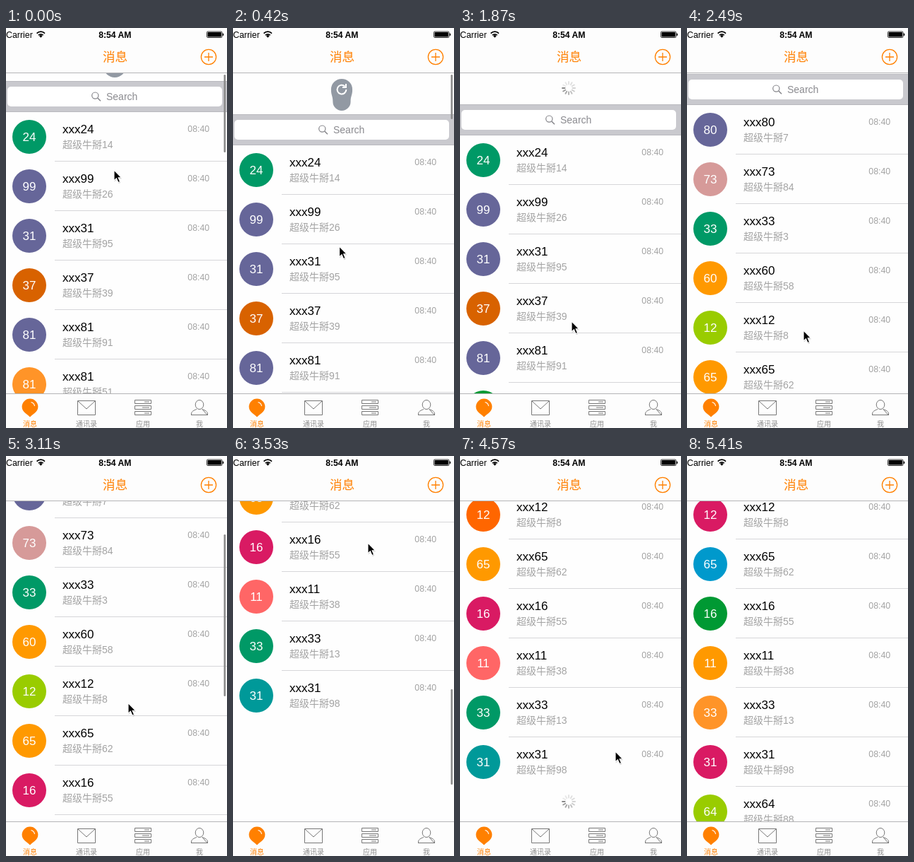
Animation of 313x566 px, one loop 5710 ms. Source, as an HTML page:

```html
<!DOCTYPE html>
<html lang="zh">
<head>
<meta charset="utf-8">
<title>消息</title>
<style>
  html, body { margin: 0; width: 100%; height: 100%; overflow: hidden; background: #fefefe; }
  svg { display: block; width: 100vw; height: 100vh; }
  text { font-family: "Liberation Sans", "Noto Sans CJK SC", "Noto Sans CJK", sans-serif; }
  .mid { text-anchor: middle; }
  .badge { font-size: 17px; fill: #fff; text-anchor: middle; }
  .name { font-size: 17px; fill: #000; }
  .note { font-size: 14px; font-weight: 300; fill: #a3a3a3; }
  .time { font-size: 12.3px; fill: #a3a3a3; }
  .rule { stroke: #d6d6d9; }
  .edge { stroke: #b4b4b6; }
  .line { fill: none; stroke: #777; }
  .tab { font-size: 10px; font-weight: 300; fill: #8c8c8c; text-anchor: middle; }
  .hot { fill: #ff8000; }
  .spin line { stroke: #777; stroke-width: 2; stroke-linecap: round; }
</style>
</head>
<body>
<svg viewBox="0 0 313 566">
  <rect width="313" height="566" fill="#fefefe"/>

  <path id="drop" fill="#9299a3"/>
  <path id="arrow" fill="none" stroke="#fff" stroke-width="2" d="M4.5-4.5A6.4 6.4 0 1 0 6.4 0M6-8V-3H1"/>
  <g id="topSpin" class="spin"></g>

  <g id="list">
    <g id="search">
      <rect width="313" height="44" fill="#c9c9ce"/>
      <path d="M0 .5H313M0 43.5H313" stroke="#b9b9be"/>
      <rect x="2" y="8" width="304" height="28" rx="5" fill="#fff"/>
      <g fill="none" stroke="#85858a" stroke-width="1.2">
        <circle cx="126.3" cy="20.6" r="4.6"/>
        <path d="M129.7 24L134 28.2" stroke-width="1.5"/>
      </g>
      <text x="142" y="27" font-size="14" fill="#8a8a8f">Search</text>
    </g>
    <g id="rows"></g>
    <g id="endSpin" class="spin"></g>
  </g>
  <rect id="bar" x="308.5" width="2.6" rx="1.3" fill="#8a8a8a"/>

  <!-- status and navigation -->
  <rect width="313" height="63" fill="#fdfdfd"/>
  <path class="edge" d="M0 63.5H313"/>
  <text x="0" y="13.5" font-size="12.4">Carrier</text>
  <g fill="none" stroke="#000" stroke-width="1.7">
    <path d="M43.6 7.6A8 8 0 0 1 55 7.6M45.9 10.2A4.8 4.8 0 0 1 52.7 10.2"/>
    <path d="M47 11.3A3.2 3.2 0 0 1 51.6 11.3L49.3 13.8Z" fill="#000" stroke="none"/>
  </g>
  <text class="mid" x="154.3" y="13.5" font-size="12.2" font-weight="bold">8:54 AM</text>
  <rect x="284.5" y="5" width="21.5" height="8.5" rx="1.3" fill="none" stroke="#000" stroke-width=".8"/>
  <rect x="285.6" y="6.1" width="19.3" height="6.3" rx=".5"/>
  <path d="M307 7.6A2 2 0 0 1 307 11Z" stroke="#000" stroke-width=".8"/>
  <text class="mid hot" x="154.5" y="47" font-size="17.6" font-weight="300">消息</text>
  <g fill="none" stroke="#ff8000" stroke-width="1.3">
    <circle cx="287" cy="41" r="10.6"/>
    <path d="M281 41H293M287 35V47"/>
  </g>

  <!-- tab bar -->
  <rect y="517" width="313" height="49" fill="#fdfdfd"/>
  <path class="edge" d="M0 517.5H313"/>
  <path class="hot" d="M34 550.5C31 547 22.6 543.500 22.6 536A11.400 11.400 0 0 1 45.400 536C45.400 543.500 37 547 34 550.5Z"/>
  <path d="M35.500 529.500A6.500 6.500 0 0 1 40.500 535" fill="none" stroke="#fff" stroke-width="1.1"/>
  <g class="line">
    <path d="M101.500 527.500H126.500V547.500H101.500ZM102 528L114 539L126 528"/>
    <path d="M182.500 526.500H205.500V531.500H182.500ZM182.500 534.500H205.500V539.500H182.500ZM182.500 542.500H205.500V547.500H182.500Z"/>
    <path d="M196 529H203M193 537H203M196 545H203"/>
    <ellipse cx="274" cy="533" rx="5.800" ry="6.500"/>
    <path d="M262.500 548V546C262.500 542.500 266 541 270 539.500M278 539.500C282 541 285.500 542.500 285.500 546V548Z"/>
    <path d="M262.500 547.500H285.500"/>
  </g>
  <text class="tab hot" x="34" y="563.5">消息</text>
  <text class="tab" x="114" y="563.5">通讯录</text>
  <text class="tab" x="194" y="563.5">应用</text>
  <text class="tab" x="274" y="563.5">我</text>

  <g id="cursor">
    <path d="M0 0V15L3.400 11.800L6 17.600L8.600 16.500L6.100 10.800H10.600Z" transform="translate(.6 1.4)" fill="#000" opacity=".2"/>
    <path d="M0 0V15L3.400 11.800L6 17.600L8.600 16.500L6.100 10.800H10.600Z" stroke="#fff" stroke-width="1.1"/>
  </g>
</svg>
<script>
const LOOP = 5710, STEP = 208, TOP = 64, SEARCH = 44, ROW = 70, MID = 154;
const REST = 340;            // scroll distance with the footer open
const RELOAD = 12, APPEND = 25;
const $ = id => document.getElementById(id);
const clamp = (v, lo, hi) => Math.min(hi, Math.max(lo, v));
const move = (el, x, y, turn = 0) =>
  el.setAttribute('transform', `translate(${x} ${y}) rotate(${turn})`);

const purple = '#666699', green = '#009966', leaf = '#009933', amber = '#ff9900',
  peach = '#ff9428', lime = '#99cc00', berry = '#d91a63';

// each row: number, note number, badge colour
const first = [[24, 14, green], [99, 26, purple], [31, 95, purple], [37, 39, '#d86200'],
  [81, 91, purple], [81, 51, peach], [45, 72, lime]];
const second = [[80, 7, purple], [73, 84, '#d69a99'], [33, 3, green], [60, 58, amber],
  [12, 8, lime], [65, 62, amber], [16, 55, berry], [11, 38, '#ff6666'],
  [33, 13, green], [31, 98, '#009999']];
const fresh = [purple, lime, green, amber, berry, '#0099cc', leaf, amber, peach, berry];
const third = second.map(([a, b], i) => [a, b, fresh[i]]).concat([[64, 88, lime], [27, 19, green]]);

const rowMarkup = ([num, note, color], i, all) => `<g transform="translate(0 ${SEARCH + i * ROW})">
  <circle cx="33" cy="35" r="24" fill="${color}"/>
  <text class="badge" x="33" y="40.5">${num}</text>
  <text class="name" x="80" y="30">xxx${num}</text>
  <text class="note" x="80" y="51">超级牛掰${note}</text>
  <text class="time" x="257.300" y="28">08:40</text>
  ${i < all.length - 1 ? '<path class="rule" d="M69 69.500H313"/>' : ''}</g>`;

const groups = [first, second, third].map(rows => {
  const g = document.createElementNS('http://www.w3.org/2000/svg', 'g');
  g.innerHTML = rows.map(rowMarkup).join('');
  $('rows').append(g);
  return g;
});
const badge = (list, row) => groups[list].children[row].querySelector('circle');

for (const id of ['topSpin', 'endSpin'])
  $(id).innerHTML = Array.from({ length: 12 }, (_, i) =>
    `<line y1="-5.500" y2="-9" transform="rotate(${i * 30})" opacity="${.16 + .7 * (i / 11) ** 2}"/>`).join('');

// key points: step, value...
const scroll = [[0, 11], [3, 82], [4, 103], [5, 116], [6, 118], [7, 78], [8, 45], [9, 44],
  [11, 44], [12, 1], [13, 0], [14, -90], [15, -220], [16, -345], [17, -434], [18, -442],
  [19, -368], [20, -342], [21, -340], [26, -340]];
const pointer = [[0, 153, 201], [5, 147, 471], [6, 148, 473], [9, 158, 415], [12, 165, 428],
  [13, 167, 425], [17, 191, 123], [18, 195, 120], [22, 220, 418], [23, 266, 508], [24, 330, 560], [26, 330, 560]];
const barFade = [[0, 1], [7, 1], [9, 0], [13, 0], [14, 1], [19, 1], [21, 0], [26, 0]];

function at(keys, n) {
  const i = Math.max(1, keys.findIndex(k => k[0] >= n));
  const a = keys[i - 1], b = keys[i], u = (n - a[0]) / (b[0] - a[0]);
  return a.slice(1).map((v, j) => v + (b[j + 1] - v) * u);
}

function drawDrop(off, on) {
  $('drop').style.display = $('arrow').style.display = on ? '' : 'none';
  if (!on) return;
  const s = clamp((off - 44) / 53, 0, 1), rt = 16 - 3.5 * s, rb = 16 - 13 * s;
  const yt = Math.min(TOP + off - 21, 87), yb = TOP + off - 5 - rb, m = (yt + yb) / 2;
  $('drop').setAttribute('d', `M${MID - rt} ${yt}A${rt} ${rt} 0 0 1 ${MID + rt} ${yt}
    C${MID + rt} ${m} ${MID + rb} ${m} ${MID + rb} ${yb}A${rb} ${rb} 0 0 1 ${MID - rb} ${yb}
    C${MID - rb} ${m} ${MID - rt} ${m} ${MID - rt} ${yt}Z`);
  move($('arrow'), MID, yt);
}

function drawBar(off, n) {
  const long = n < RELOAD ? 121 : 229, low = 66, high = 465;
  const over = off > 0 ? off : Math.max(0, -off - REST);
  const h = Math.max(7, long - over);
  const y = off > 0 ? low : low + (high - low - h) * Math.min(1, -off / REST);
  $('bar').setAttribute('y', y);
  $('bar').setAttribute('height', h);
  $('bar').style.opacity = at(barFade, n)[0];
}

function draw(n) {
  const off = Math.round(at(scroll, n)[0]);
  const shown = n < RELOAD ? 0 : n < APPEND ? 1 : 2;
  groups.forEach((g, i) => g.style.display = i === shown ? '' : 'none');
  badge(0, 5).setAttribute('fill', n < 7 ? peach : leaf);
  badge(1, 4).setAttribute('fill', n < 18 ? lime : '#ff6600');
  move($('list'), 0, TOP + off);

  drawDrop(off, n < 4);
  drawBar(off, n);
  const turn = Math.floor(n * 2.5) * 30;
  $('topSpin').style.opacity = n > 5 && n < RELOAD ? 1 : 0;
  move($('topSpin'), MID, 85, turn);
  $('endSpin').style.opacity = n > 17 && n < APPEND ? 1 : 0;
  move($('endSpin'), MID, SEARCH + second.length * ROW + 21, turn + 90);
  move($('cursor'), ...at(pointer, n));
}

let last = -1;
const start = performance.now();
function tick(now) {
  const t = Math.max(0, now - start) % LOOP;
  const n = Math.min(26, Math.floor((t + 8) / STEP));
  if (n !== last) draw(last = n);
  requestAnimationFrame(tick);
}
draw(0);
requestAnimationFrame(tick);
</script>
</body>
</html>
```
